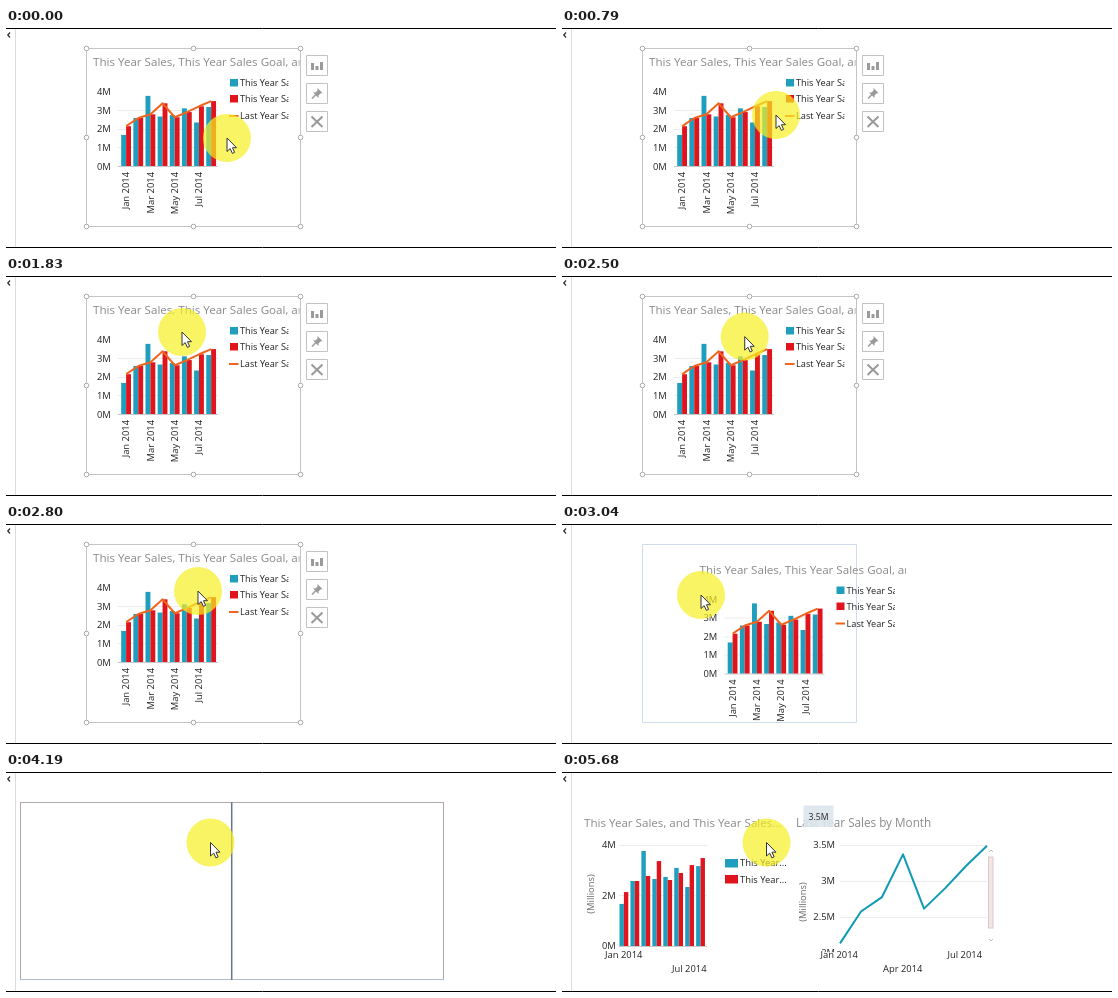
Write an HTML page that moves like this. It is 550 px wide and 220 px high and loops after 8.74 s.

```html
<!DOCTYPE html>
<html lang="en">
<head>
<meta charset="utf-8">
<title>Sales charts</title>
<style>
html, body { margin: 0; width: 100%; height: 100%; overflow: hidden; background: #fff; }
svg { display: block; width: 550px; height: 220px; font-family: "Open Sans", "Noto Sans", sans-serif; }
text { font-size: 9.4px; fill: #222; white-space: pre; }
text.title { font-size: 11.6px; fill: #8a8a8a; }
text.legend { font-size: 9.2px; }
text.unit { fill: #666; }
</style>
</head>
<body>
<svg id="stage" viewBox="0 0 550 220">
  <defs>
    <clipPath id="titleClip"><rect x="80" y="20" width="213.5" height="30"/></clipPath>
    <clipPath id="legendClip"><rect x="220" y="46" width="62.5" height="52"/></clipPath>
    <clipPath id="tickClip"><rect x="255" y="172" width="20" height="8.3"/></clipPath>
  </defs>
  <rect width="550" height="220" fill="#fff"/>
  <path id="outline" d="M80.5 20.5H294.5V198.5H80.5Z" fill="none" stroke="#cfdcec"/>
  <g id="combo"></g>
  <g id="tools" fill="none" stroke="#c2c2c2">
    <path d="M300.5 27.500h21v20h-21zM300.5 55.500h21v20h-21zM300.5 83.500h21v20h-21z"/>
    <path d="M306.500 35v7M311 38v4M315.500 34v8" stroke="#9a9a9a" stroke-width="3"/>
    <path d="M306 70.500l4-4" stroke="#999" stroke-width="1.500"/>
    <path d="M311.500 60l5 5-2 .5-2 2 0 2.500-5.500-5.500 2.500 0 2-2z" fill="#999" stroke="none"/>
    <path d="M305.500 88.500l11 10.500M316.500 88.500l-11 10.500" stroke="#999" stroke-width="2"/>
  </g>
  <g id="panes" fill="none" stroke-width="1">
    <path d="M14.5 30.5H437.5" stroke="#b5a8a8"/>
    <path d="M14.5 30V208M437.5 30V208" stroke="#aaa8b4"/>
    <path d="M14.5 207.5H437.5" stroke="#b4bccf"/>
    <path d="M225.700 30V208" stroke="#64788c" stroke-width="1.500"/>
  </g>
  <g id="pair"></g>
  <g id="scroll" fill="none" stroke="#c4bcbc">
    <rect x="426.500" y="85" width="4.500" height="71" fill="#f4e4e2" stroke="#d9cccc"/>
    <path d="M427 80l2-2 2 2M427 167l2 2 2-2"/>
  </g>
  <g id="tip">
    <rect x="241.500" y="33.500" width="30" height="21.500" fill="#dce5ee" opacity=".9"/>
    <text x="256.500" y="48" text-anchor="middle" style="font-size:8.600px">3.5M</text>
  </g>
  <path d="M9.500 1V219" stroke="#dcdcdc"/>
  <path d="M4 4.500L1.800 7L4 9.500" fill="none" stroke="#333" stroke-width="1.300"/>
  <path d="M0 .5H550M0 219.500H550" stroke="#000"/>
  <g id="cursor">
    <circle r="24" fill="#f7f022" opacity=".7"/>
    <path d="M0 0V13.500L3.200 10.600L5.400 15.400L7.600 14.400L5.500 9.700H9.500Z" fill="#fff" stroke="#333" stroke-width="1" stroke-linejoin="round"/>
  </g>
</svg>
<script>
const LOOP = 8740;
const TEAL = '#1f9fbd', RED = '#e0141c', ORANGE = '#f0641e';
const sales = [1.67, 2.58, 3.77, 2.66, 2.74, 3.1, 2.34, 3.17];
const goal = [2.14, 2.58, 2.78, 3.37, 2.62, 2.9, 3.21, 3.49];
const $ = id => document.getElementById(id);

const text = (x, y, s, extra = '') => `<text x="${x}" y="${y}" ${extra}>${s}</text>`;
const rect = (x, y, w, h, fill) => `<rect x="${x}" y="${y}" width="${w}" height="${h}" fill="${fill}"/>`;
const rule = (x1, x2, y, color) => `<path d="M${x1} ${y}H${x2}" stroke="${color}"/>`;
const upright = (x, y, s, anchor, cls = '') =>
  text(0, 0, s, `class="${cls}" text-anchor="${anchor}" transform="translate(${x} ${y}) rotate(-90)"`);
const line = (values, x, step, y, color) =>
  `<polyline points="${values.map((v, i) => `${x + i * step},${y(v)}`).join(' ')}" fill="none" stroke="${color}" stroke-width="2" stroke-linejoin="round"/>`;

function bars(x, step, w, base, unit) {
  return sales.map((v, i) =>
    rect(x + i * step, base - v * unit, w, v * unit, TEAL) +
    rect(x + i * step + w, base - goal[i] * unit, w, goal[i] * unit, RED)).join('');
}

function comboChart() {
  const base = 138, unit = 18.6;
  let s = `<g clip-path="url(#titleClip)">${text(87, 38, 'This Year Sales, This Year Sales Goal, and', 'class="title"')}</g>`;
  for (let i = 0; i < 5; i++) {
    s += text(91, 141.5 - i * unit, i + 'M');
    if (i < 4) s += rule(112, 212, Math.round(base - i * unit) + .5, i ? '#ececec' : '#c8c8c8');
  }
  s += bars(115.2, 12.15, 4.9, base, unit);
  s += line(goal, 120.2, 12.15, v => base - v * unit, ORANGE);
  ['Jan', 'Mar', 'May', 'Jul'].forEach((m, i) => s += upright(123.3 + i * 24.3, 144, m + ' 2014', 'end'));
  s += '<g clip-path="url(#legendClip)">' +
    rect(224, 51, 8, 7.5, TEAL) + text(234, 58, 'This Year Sales', 'class="legend"') +
    rect(224, 67, 8, 7.5, RED) + text(234, 74.3, 'This Year Sales Goal', 'class="legend"') +
    `<path d="M223 88H232.500" stroke="${ORANGE}" stroke-width="2"/>` +
    text(234, 91, 'Last Year Sales', 'class="legend"') + '</g>';
  return s;
}

function handles() {
  let s = '<path d="M80.5 20.5H294.5V198.5H80.5Z" fill="none" stroke="#c4c4c4"/>';
  for (const x of [80.5, 187.5, 294.5])
    for (const y of [20.5, 109.5, 198.5])
      if (x !== 187.5 || y !== 109.5) s += `<circle cx="${x}" cy="${y}" r="2.300" fill="#fff" stroke="#aaa"/>`;
  return `<g id="handles">${s}</g>`;
}

function pairCharts() {
  let s = text(22, 55, 'This Year Sales, and This Year Sales...', 'class="title"');
  s += upright(32, 122, '(Millions)', 'middle', 'unit');
  ['4M', '2M', '0M'].forEach((t, i) => {
    s += text(40, 76.3 + i * 50.4, t);
    s += rule(57, 145, [73.5, 123.5, 174.5][i], i < 2 ? '#ececec' : '#c8c8c8');
  });
  s += bars(57.5, 10.95, 4.4, 174, 25.2);
  s += text(43, 186, 'Jan 2014') + text(110, 200, 'Jul 2014');
  s += rect(163, 87, 13, 8.5, TEAL) + text(178, 94.3, 'This Year...');
  s += rect(163, 103, 13, 8.5, RED) + text(178, 110.6, 'This Year...');

  s += text(234, 55, 'Last Year Sales by Month', 'class="title" style="font-size:11.700px"');
  s += upright(244, 130, '(Millions)', 'middle', 'unit');
  ['3.5M', '3M', '2.5M'].forEach((t, i) => {
    s += text(273, 76.3 + i * 36, t, 'text-anchor="end"') + rule(278, 425, 73.5 + i * 36, '#ececec');
  });
  s += `<g clip-path="url(#tickClip)">${text(273, 184, '2M', 'text-anchor="end"')}</g>`;
  s += line(goal, 278, 21, v => 73 + (3.5 - v) * 72.3, '#0f9ab4');
  s += text(258.5, 186, 'Jan 2014') + text(321, 200, 'Apr 2014') + text(385.5, 186, 'Jul 2014');
  return s;
}

$('combo').innerHTML = handles() + comboChart();
$('pair').innerHTML = pairCharts();

// time, x, y
const path = [
  [430, 221, 110], [790, 214, 87], [980, 204, 78],
  [1110, 204, 78], [1830, 176, 56],
  [2260, 176, 56], [2800, 192, 67], [3040, 139, 71],
  [3230, 139, 71], [3290, 80, 73]
];
const clamp = (v, a = 0, b = 1) => Math.min(b, Math.max(a, v));
const smooth = k => k * k * (3 - 2 * k);

function pointer(t) {
  if (t >= 4190) return [204.5, 70.5];
  if (t <= path[0][0]) return path[0].slice(1);
  for (let i = 1; i < path.length; i++) {
    const [t0, x0, y0] = path[i - 1], [t1, x1, y1] = path[i];
    if (t < t1) {
      const k = smooth((t - t0) / (t1 - t0));
      return [x0 + (x1 - x0) * k, y0 + (y1 - y0) * k];
    }
  }
  return path[path.length - 1].slice(1);
}

function shift(t) {
  if (t >= 3260) return [27, 12];
  const k = smooth(clamp((t - 2860) / 180));
  return [50.5 * k, 11.5 * k];
}

const show = (id, alpha) => {
  $(id).style.display = alpha > 0 ? '' : 'none';
  $(id).style.opacity = alpha;
};

function draw(t) {
  const dragging = t >= 2860 && t < 3260;
  $('cursor').setAttribute('transform', `translate(${pointer(t)})`);
  $('combo').setAttribute('transform', `translate(${shift(t)})`);
  show('combo', t < 4190 ? 1 : 0);
  show('handles', t < 2860 || (t >= 3260 && t < 3790) ? 1 : 0);
  show('outline', dragging ? 1 : 0);
  show('tools', t < 2860 ? 1 : 0);
  show('panes', t < 4190 || t >= 4770 ? 0 : t < 4310 ? 1 : .6);
  show('pair', t < 4740 ? 0 : t < 4770 ? .6 : 1);
  show('scroll', t >= 4970 ? 1 : 0);
  show('tip', t < 5530 ? 0 : clamp((Math.floor((t - 5530) / 50) + 1) / 4));
}

const start = performance.now();
function tick() {
  draw((performance.now() - start) % LOOP);
  requestAnimationFrame(tick);
}
draw(0);
requestAnimationFrame(tick);
</script>
</body>
</html>
```
